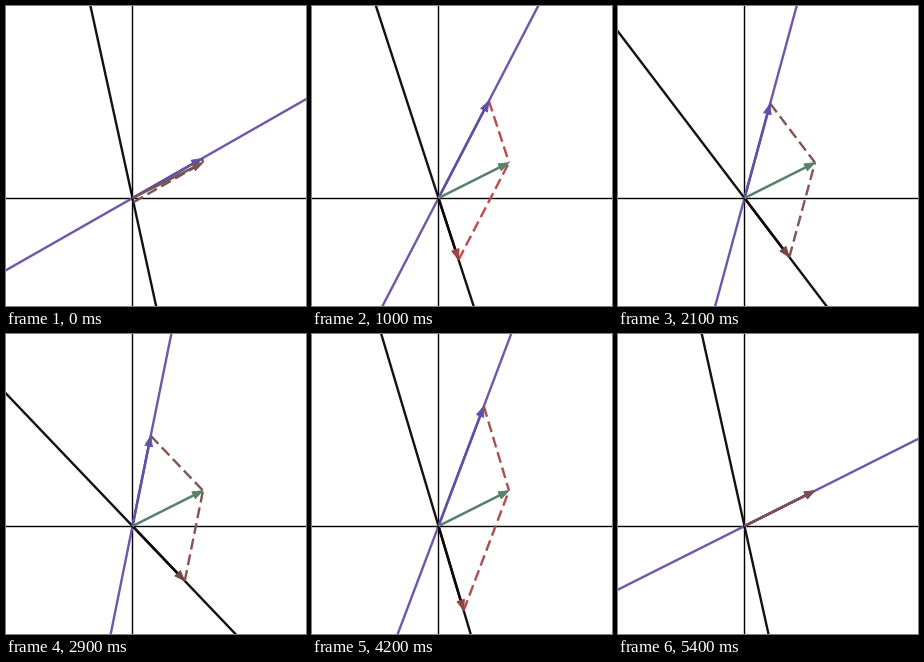
A matplotlib script for the animation above (5.5 s loop, 300 by 300 pixels).

```python
import numpy as np
import matplotlib.pyplot as plt
from matplotlib.animation import FuncAnimation

SIZE, DPI = 300, 100
PX = 72 / DPI                      # points per pixel
FRAMES, INTERVAL = 55, 100

ORIGIN = np.array([126.5, 192.1])
VECTOR = np.array([70.5, 35.5])    # y points up
LOW, HIGH = 0.5, 5.0               # both slopes bounce in this range
SPAN = HIGH - LOW

PURPLE = (0.435, 0.345, 0.66)
DEEP_PURPLE = (0.385, 0.315, 0.65)
INK = (0.08, 0.075, 0.08)
DARK = (0.07, 0.03, 0.03)
RED = np.array([0.77, 0.29, 0.30])
DULL = np.array([0.45, 0.34, 0.34])
GREEN = np.array([0.35, 0.50, 0.41])
BROWN = np.array([0.49, 0.31, 0.32])


def mix(a, b, k):
    return a + (b - a) * k


def bounce(d):
    """Triangle wave: 0 up to SPAN and back."""
    return SPAN - abs(abs(d) % (2 * SPAN) - SPAN)


def travelled(i):
    """Distance covered by the slopes: a slow start, then a steady run."""
    a = np.pi * i / (FRAMES - 1)
    return 0.43 + 0.168 * i - 0.265 * np.sin(a) - 0.04 * np.sin(2 * a)


def to_stage(v):
    return ORIGIN + np.array([v[0], -v[1]])


fig = plt.figure(figsize=(SIZE / DPI, SIZE / DPI), dpi=DPI, facecolor="white")
ax = fig.add_axes([0, 0, 1, 1])
ax.set_xlim(0, SIZE)
ax.set_ylim(SIZE, 0)
ax.axis("off")


def stroke(colour, width, z, **style):
    return ax.plot([], [], color=colour, lw=width * PX, zorder=z,
                   snap=False, **style)[0]


class Arrow:
    LENGTH, HALF = 10.5, 3.9

    def __init__(self, colour, z):
        self.shaft = stroke(colour, 2.5, z, solid_capstyle="butt")
        self.head = ax.fill([0, 0, 0], [0, 0, 0], color=colour, lw=0.8 * PX,
                            joinstyle="round", zorder=z + 0.5)[0]

    def point_to(self, tip):
        step = tip - ORIGIN
        size = np.hypot(*step)
        show = size > self.LENGTH
        self.shaft.set_visible(show)
        self.head.set_visible(show)
        if not show:
            return
        along = step / size
        side = np.array([-along[1], along[0]]) * self.HALF
        base = tip - along * self.LENGTH
        self.shaft.set_data(*zip(ORIGIN, base + along * 2))
        self.head.set_xy([tip, base + side, base - side])


ax.axhline(192.5, color="black", lw=1.4 * PX, zorder=1, snap=False)
ax.axvline(126.5, color="black", lw=1.4 * PX, zorder=1, snap=False)
purple_line = stroke(PURPLE, 2.4, 2)
black_line = stroke(INK, 2.4, 3)
dash_style = (0, (11 / 2.4, 5 / 2.4))
dashes = [stroke(RED, 2.4, 4, linestyle=dash_style) for _ in range(2)]
purple_arrow = Arrow(DEEP_PURPLE, 5)
black_arrow = Arrow(DARK, 5)
vector_arrow = Arrow(GREEN, 6)


def set_line(line, slope):
    reach = np.array([-400, 400])
    line.set_data(ORIGIN[0] + reach, ORIGIN[1] - slope * reach)


def draw(i):
    travel = travelled(i)
    up = LOW + bounce(travel - 0.5)
    down = bounce(travel) - HIGH
    set_line(purple_line, up)
    set_line(black_line, down)

    # Split the vector along the two lines
    x = (VECTOR[1] - down * VECTOR[0]) / (up - down)
    part = np.array([x, up * x])
    rest = VECTOR - part
    tips = to_stage(part), to_stage(rest)
    end = to_stage(VECTOR)

    # The dashes glow red twice per loop
    dash_colour = mix(DULL, RED, np.sin(np.pi * i / 25) ** 2)
    for line, tip in zip(dashes, tips):
        line.set_data(*zip(tip, end))
        line.set_color(dash_colour)

    purple_arrow.point_to(tips[0])
    black_arrow.point_to(tips[1])
    black_arrow.head.set_color(dash_colour * 0.85)

    # The vector turns brown as it meets the purple line
    vector_arrow.point_to(end)
    colour = mix(BROWN, GREEN, min(1, np.hypot(*rest) / 40))
    vector_arrow.shaft.set_color(colour)
    vector_arrow.head.set_color(colour)
    return []


anim = FuncAnimation(fig, draw, frames=FRAMES, interval=INTERVAL,
                     repeat=True, repeat_delay=0, blit=False)
plt.show()
```
